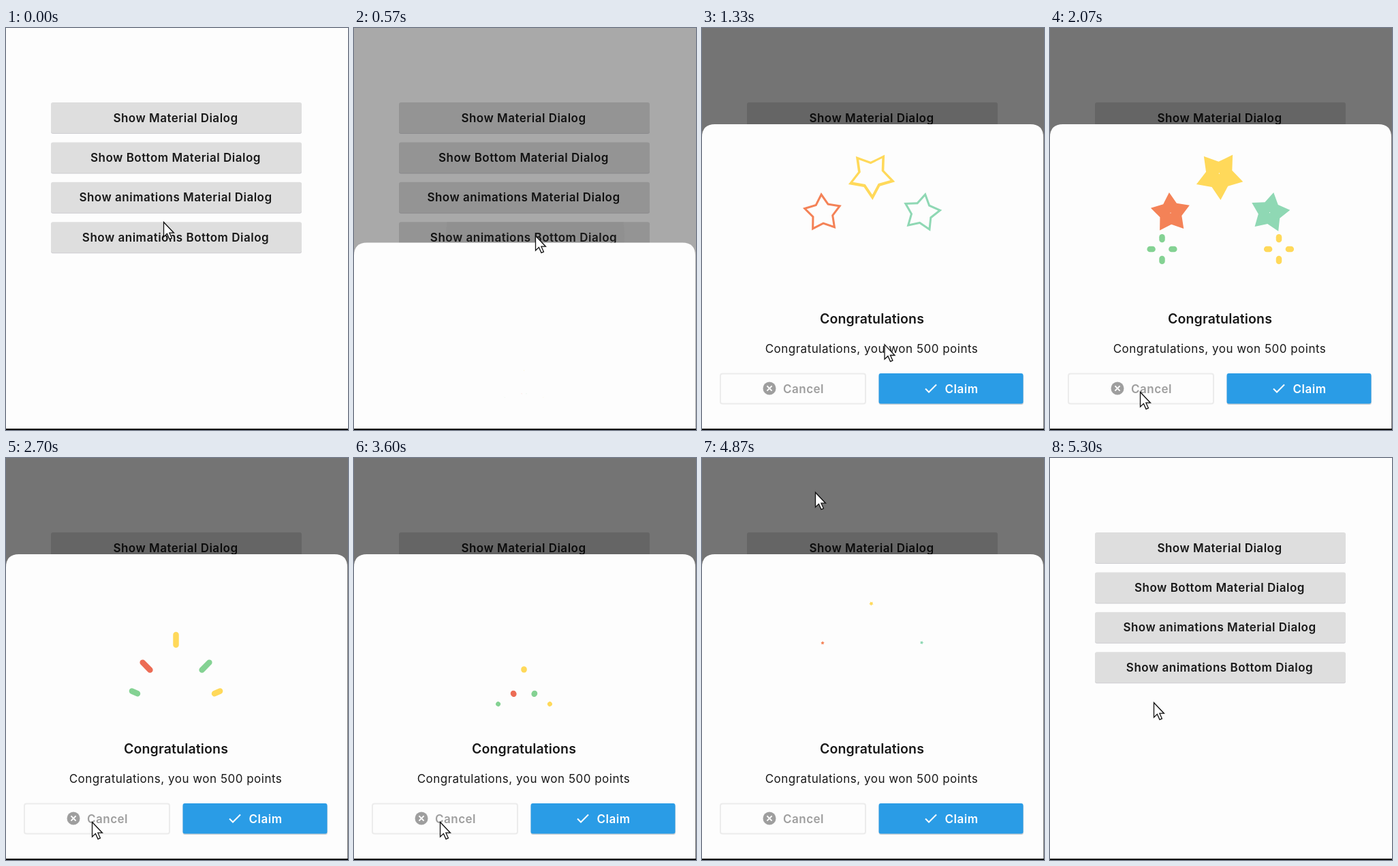
Write an HTML page that moves like this. It is 502x589 px and loops after 5.33 s.

```html
<!DOCTYPE html>
<html lang="en">
<head>
<meta charset="utf-8">
<style>
  html, body { margin: 0; width: 100%; height: 100%; overflow: hidden; background: #fdfdfd; }
  svg { display: block; width: 502px; height: 589px; }
  text { font-family: Inter, "Open Sans", sans-serif; font-size: 17px; font-weight: 600; letter-spacing: .5px; text-anchor: middle; fill: #181818; }
  .dash { stroke-linecap: round; }
</style>
</head>
<body>
<svg viewBox="0 0 502 589">
  <rect width="502" height="589" fill="#fdfdfd"/>
  <g id="buttons"></g>
  <clipPath id="buttonClip"><rect x="66" y="284" width="368" height="45" rx="3"/></clipPath>
  <g clip-path="url(#buttonClip)"><circle id="ripple" cx="266" cy="305" fill="#888"/></g>
  <rect id="barrier" width="502" height="587" fill="#000"/>
  <g id="sheet">
    <path d="M0 588V160Q0 141 19 141H482Q501 141 501 160V588Z" fill="#fdfdfd"/>
    <g id="burst"></g>
    <text x="249.5" y="433" style="font-size:19.5px;letter-spacing:.15px">Congratulations</text>
    <text x="249" y="476" style="font-weight:400">Congratulations, you won 500 points</text>
    <rect x="27" y="506.5" width="213" height="44" rx="3" fill="#fdfdfd" stroke="#ececec" stroke-width="2"/>
    <circle cx="99" cy="528" r="9.5" fill="#9e9e9e"/>
    <path d="M95.4 524.4l7.2 7.2m0-7.2l-7.2 7.2" stroke="#fdfdfd" stroke-width="2"/>
    <text x="149" y="535" style="fill:#9e9e9e">Cancel</text>
    <rect x="259.5" y="508" width="212.5" height="44" rx="3" fill="#bbb" opacity=".6"/>
    <rect x="259.5" y="506" width="212" height="44.5" rx="3" fill="#2a9ce6"/>
    <path d="M328 528.5l5 5 11-11" fill="none" stroke="#fff" stroke-width="2"/>
    <text x="381" y="535" style="fill:#fff">Claim</text>
  </g>
  <rect y="587" width="502" height="2" fill="#050505"/>
  <path id="cursor" d="M.5 .5V22L5.4 17.4 9 25.3 12.4 23.8 8.9 16.2H15.4Z" fill="#fff" stroke="#111" stroke-width="1.3"/>
</svg>
<script>
const LOOP = 5330, OPEN_AT = 480, CLOSE_AT = 4890;
const BURST_AT = 570, BURST_PERIOD = 1000, MID = 249.5, DASH_WIDTH = 8.5;
const YELLOW = '#ffd95a', RED = '#ec6c55', ORANGE = '#f48257', GREEN = '#84d293', MINT = '#8fd8b4';

const $ = id => document.getElementById(id);
const span = (t, a, b) => Math.max(0, Math.min(1, (t - a) / (b - a)));
const mix = (a, b, u) => a + (b - a) * u;
const easeOut = u => 1 - (1 - u) ** 2;
const easeInOut = u => u * u * (3 - 2 * u);
const radians = degrees => degrees * Math.PI / 180;

function set(el, attrs) {
  for (const k in attrs) el.setAttribute(k, attrs[k]);
}
function add(parent, tag, attrs) {
  const el = document.createElementNS('http://www.w3.org/2000/svg', tag);
  set(el, attrs);
  return parent.appendChild(el);
}

['Material', 'Bottom Material', 'animations Material', 'animations Bottom'].forEach((kind, i) => {
  const y = 109 + i * 58.4, box = { x: 66, width: 368, height: 45, rx: 3 };
  add($('buttons'), 'rect', { ...box, y: y + 1, fill: '#cecdd2' });
  add($('buttons'), 'rect', { ...box, y, fill: '#dedede' });
  add($('buttons'), 'text', { x: 249, y: y + 28.5 }).textContent = `Show ${kind} Dialog`;
});

const burst = $('burst');
const newDash = color => add(burst, 'line', { class: 'dash', stroke: color });

// Each stick flies from one point to another, given relative to the middle axis, while it turns.
const stick = (side, color, size, from, to, turn) => ({ side, size, from, to, turn, el: newDash(color) });
const fan = (left, right, ...shape) => [stick(-1, left, ...shape), stick(1, right, ...shape)];
const sticks = [
  stick(1, YELLOW, 23.5, [0, 329], [0, 250], [90, 90]),
  ...fan(RED, GREEN, 24, [3, 363], [54, 290], [74, 38]),
  ...fan(GREEN, YELLOW, 17.5, [28, 368], [69, 337], [40, 20])
];

const star = (x, y, r, angle, color) =>
  ({ x, y, r, angle, el: add(burst, 'path', { fill: color, 'fill-rule': 'evenodd' }) });
const stars = [
  star(248.5, 216, 36, 15, YELLOW),
  star(177, 271, 30, -94, ORANGE),
  star(322.5, 270.5, 30, -79, MINT)
];

const cross = (x, color) => ({ x, y: 324, arms: [0, 90, 180, 270].map(angle => ({ angle, el: newDash(color) })) });
const crosses = [cross(164.5, GREEN), cross(336, YELLOW)];

function drawDash(el, x, y, angle, length) {
  const half = Math.max(.01, length - DASH_WIDTH) / 2;
  const dx = Math.cos(radians(angle)) * half, dy = Math.sin(radians(angle)) * half;
  set(el, {
    x1: x - dx, y1: y - dy, x2: x + dx, y2: y + dy,
    'stroke-width': Math.min(DASH_WIDTH, length), opacity: length > .2 ? 1 : 0
  });
}

function starPath(x, y, r, angle) {
  const points = Array.from({ length: 10 }, (_, i) => {
    const a = radians(angle + i * 36), q = i % 2 ? r * .56 : r;
    return `${(x + q * Math.cos(a)).toFixed(2)} ${(y + q * Math.sin(a)).toFixed(2)}`;
  });
  return `M${points.join('L')}Z`;
}

function drawBurst(p) {
  const fly = span(p, 0, 240), way = easeOut(fly);
  for (const { side, size, from, to, turn, el } of sticks) {
    drawDash(el, MID + side * mix(from[0], to[0], way), mix(from[1], to[1], way),
      -side * mix(turn[0], turn[1], way), size * Math.sin(Math.PI * fly));
  }

  // A star grows, then a star-shaped hole eats it from the inside.
  const grow = easeInOut(span(p, 260, 480)), hole = easeInOut(span(p, 460, 880));
  for (const { x, y, r, angle, el } of stars) {
    const turned = angle - 70 * (1 - grow);
    const outline = size => starPath(x, y - 3 * (1 - size) * (r > 30), r * size, turned);
    el.setAttribute('d', hole < 1 ? outline(grow) + outline(hole) : '');
  }

  const spread = span(p, 310, 720);
  for (const { x, y, arms } of crosses) {
    const reach = 25 * easeOut(spread) - 2;
    for (const { angle, el } of arms) {
      drawDash(el, x + reach * Math.cos(radians(angle)), y + reach * Math.sin(radians(angle)),
        angle, 12.5 * Math.sin(Math.PI * spread));
    }
  }
}

// Pointer trips: start time and destination.
const MOVE = 400;
const trips = [
  [-MOVE, 231, 284], [20, 266, 304], [1060, 268, 515], [1510, 132, 533],
  [2150, 126, 533], [3690, 200, 555], [4400, 166, 50], [4890, 152, 358]
];
const pointerAt = t => trips.reduce(([x, y], [at, toX, toY]) => {
  const u = easeInOut(span(t, at, at + MOVE));
  return [mix(x, toX, u), mix(y, toY, u)];
}, [0, 0]);

function draw(t) {
  const open = easeOut(span(t, OPEN_AT, OPEN_AT + 240)) - easeInOut(span(t, CLOSE_AT, CLOSE_AT + 240));
  set($('barrier'), { opacity: .54 * open });
  set($('sheet'), { transform: `translate(0 ${(1 - open) * 450})` });

  const press = span(t, 440, 640);
  set($('ripple'), { r: 200 * press, opacity: .25 * (1 - press) });

  drawBurst(t < BURST_AT ? 0 : (t - BURST_AT) % BURST_PERIOD);
  set($('cursor'), { transform: `translate(${pointerAt(t)})` });
}

const start = performance.now();
function tick() {
  draw((performance.now() - start) % LOOP);
  requestAnimationFrame(tick);
}
tick();
</script>
</body>
</html>
```
